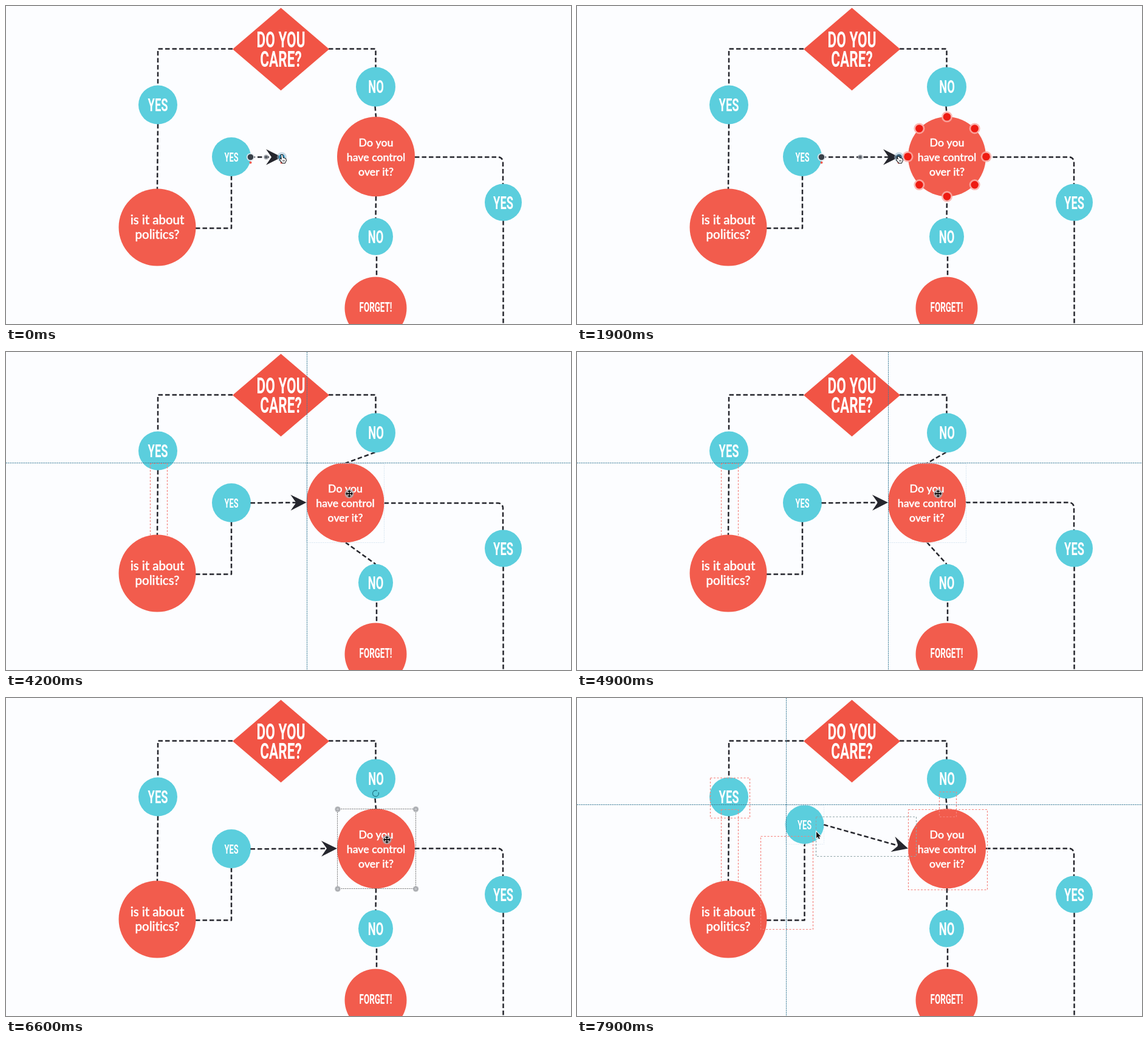
An HTML page with a canvas for the animation above (8 s loop, 930 px wide and 523 px high).

```html
<!DOCTYPE html>
<html lang="en">
<head>
<meta charset="utf-8">
<title>Flowchart editing</title>
<style>
  html, body { margin: 0; width: 100%; height: 100%; overflow: hidden; background: #fcfdff; }
  canvas { display: block; width: 930px; height: 523px; }
</style>
</head>
<body>
<canvas id="stage" width="930" height="523"></canvas>
<script>
const ctx = document.getElementById('stage').getContext('2d');
const LOOP = 8000, STEP = 100, TAU = Math.PI * 2;
const PAPER = '#fcfdff', RED = '#f25c4d', TEAL = '#5bcedd', INK = '#25262d';
const PINK = '#f5827c', GUIDE = '#3c7d98';
const CONDENSED = 0.61;

// Key lists: [time, ...values], linear in between.
const lineEndKeys = [[1300, 454], [1900, 530], [2200, 545]];
const circleKeys = [[3900, 609], [4200, 558.5], [4400, 537], [4800, 560],
  [5100, 608], [5400, 623.5], [5700, 617], [6000, 609]];
const yesKeys = [[7100, 371, 248], [7500, 373, 226], [7900, 374.5, 208]];
const cursorKeys = [[1300, 456, 251], [1900, 531, 251], [2200, 546, 251], [3000, 546, 251],
  [3400, 613, 239], [3900, 627, 233], [4200, 565, 233], [4400, 549, 233], [4800, 578, 233],
  [5100, 627, 233], [5400, 642, 233], [5700, 635, 233], [6000, 627, 233],
  [6600, 627, 233], [7000, 390, 260], [7100, 390, 260], [7900, 394, 220]];

function track(keys, t) {
  if (t <= keys[0][0]) return keys[0].slice(1);
  for (let i = 1; i < keys.length; i++) {
    const a = keys[i - 1], b = keys[i];
    if (t <= b[0]) {
      const k = (t - a[0]) / (b[0] - a[0]);
      return a.slice(1).map((v, j) => v + (b[j + 1] - v) * k);
    }
  }
  return keys[keys.length - 1].slice(1);
}

// Centres a hairline on a pixel.
const crisp = v => Math.floor(v) + 0.5;

function oval(x, y, rx, ry, fill) {
  ctx.beginPath();
  ctx.ellipse(x, y, rx, ry, 0, 0, TAU);
  ctx.fillStyle = fill;
  ctx.fill();
}

function ring(x, y, r, color, width) {
  ctx.beginPath();
  ctx.arc(x, y, r, 0, TAU);
  ctx.strokeStyle = color;
  ctx.lineWidth = width;
  ctx.stroke();
}

function polygon(points, fill, outline) {
  ctx.beginPath();
  points.forEach(([x, y]) => ctx.lineTo(x, y));
  ctx.closePath();
  if (outline) {
    ctx.strokeStyle = outline;
    ctx.lineWidth = 2;
    ctx.stroke();
  }
  ctx.fillStyle = fill;
  ctx.fill();
}

function dashed(points, color = INK, width = 2.5, dash = [7.5, 4], corner = 0) {
  ctx.save();
  ctx.setLineDash(dash);
  ctx.strokeStyle = color;
  ctx.lineWidth = width;
  ctx.lineJoin = 'round';
  ctx.beginPath();
  ctx.moveTo(...points[0]);
  points.slice(1).forEach((p, i) => {
    const next = points[i + 2];
    if (corner && next) ctx.arcTo(...p, ...next, corner);
    else ctx.lineTo(...p);
  });
  ctx.stroke();
  ctx.restore();
}

function box(x0, y0, x1, y1, color = PINK, dash = [3, 2.5], width = 1.2) {
  const [l, t, r, b] = [x0, y0, x1, y1].map(crisp);
  dashed([[l, t], [r, t], [r, b], [l, b], [l, t]], color, width, dash);
}

// Frame around a connector, padded on all sides.
function linkBox(x0, y0, x1, y1, color) {
  const pad = 13;
  box(Math.min(x0, x1) - pad, Math.min(y0, y1) - pad,
    Math.max(x0, x1) + pad, Math.max(y0, y1) + pad, color);
}

function caps(text, x, y, size) {
  ctx.save();
  ctx.translate(x, y + size * 0.355);
  ctx.scale(CONDENSED, 1);
  ctx.font = `700 ${size}px Roboto, "Liberation Sans", sans-serif`;
  ctx.textAlign = 'center';
  ctx.fillStyle = '#fff';
  ctx.fillText(text, 0, 0);
  ctx.restore();
}

function label(lines, x, y, size, leading) {
  ctx.save();
  ctx.font = `500 ${size}px Lato, sans-serif`;
  ctx.letterSpacing = '0.01px'; // turns ligatures off
  ctx.textAlign = 'center';
  ctx.fillStyle = ctx.strokeStyle = '#fff';
  ctx.lineWidth = 0.45;
  lines.forEach((line, i) => {
    ctx.fillText(line, x, y + i * leading);
    ctx.strokeText(line, x, y + i * leading);
  });
  ctx.restore();
}

function arrow(x0, y0, x1, y1) {
  const angle = Math.atan2(y1 - y0, x1 - x0);
  dashed([[x0, y0], [x1 - 14 * Math.cos(angle), y1 - 14 * Math.sin(angle)]]);
  ctx.save();
  ctx.translate(x1, y1);
  ctx.rotate(angle);
  polygon([[0, 0], [-26, -13], [-17, 0], [-26, 13]], INK);
  ctx.restore();
}

function knob(x, y, r, fill) {
  oval(x, y, r + 1.8, r + 1.8, 'rgba(225,232,238,0.9)');
  oval(x, y, r, r, fill);
}

function guides(x, y) {
  dashed([[crisp(x), 0], [crisp(x), 523]], GUIDE, 1, [2, 1]);
  dashed([[0, crisp(y)], [930, crisp(y)]], GUIDE, 1, [2, 1]);
}

function lineHandles(x1, t) {
  const x0 = 402.5, y = 248.5;
  knob(x0, y, 4.8, '#3a4149');
  oval((x0 + x1) / 2, y, 4, 4, 'rgba(150,155,162,0.8)');
  oval((x0 + x1) / 2, y, 2.3, 2.3, '#555b63');
  oval(x0, 257.5, 2, 2, '#ee5a50');
  oval(x1 - 0.5, 257.5, 2, 2, '#ee5a50');
  if (t >= 2300 && t < 3600) ring(x1, y, 14, 'rgba(160,155,160,0.35)', 3);
  if (t < 2700) {
    oval(x1, y, 8, 8, 'rgba(160,190,210,0.55)');
    oval(x1, y, 4.8, 4.8, t < 800 ? '#2c9ac8' : '#3a6079');
  } else knob(x1, y, 4.8, '#3a4149');
}

function anchors(cx, cy) {
  for (let i = 0; i < 8; i++) {
    const a = i * TAU / 8;
    const x = cx + 64.5 * Math.cos(a), y = cy + 65.5 * Math.sin(a);
    oval(x, y, 9, 9, 'rgba(250,170,165,0.85)');
    oval(x, y, 6.3, 6.3, '#ee1b12');
  }
}

function selection(cx) {
  const x0 = cx - 63.5, x1 = cx + 65;
  box(x0, 182, x1, 313, '#555', [1.5, 1.5], 1);
  for (const x of [x0 + 0.5, x1 + 0.5]) for (const y of [183, 314]) {
    oval(x, y, 4.8, 4.8, '#c0c2c6');
    ring(x, y, 3, '#96999d', 1);
  }
  ctx.beginPath();
  ctx.arc(608.5, 157, 5, -0.4, 5.2);
  ctx.strokeStyle = '#247d8c';
  ctx.lineWidth = 1.3;
  ctx.stroke();
}

function moveCursor(x, y, pressed) {
  ctx.save();
  ctx.translate(x, y);
  if (pressed) oval(0, 0, 7.5, 7.5, 'rgba(170,170,175,0.85)');
  for (const [color, width] of [['#fff', 3.2], ['#111', 1.8]]) {
    ctx.strokeStyle = color;
    ctx.lineWidth = width;
    ctx.beginPath();
    ctx.moveTo(-4, 0); ctx.lineTo(4, 0);
    ctx.moveTo(0, -4); ctx.lineTo(0, 4);
    ctx.stroke();
  }
  for (let i = 0; i < 4; i++) {
    polygon([[6, 0], [3, -2.8], [3, 2.8]], '#111');
    ctx.rotate(TAU / 4);
  }
  ctx.restore();
}

function handCursor(x, y, pressed) {
  ctx.save();
  ctx.translate(x, y);
  const top = pressed ? -3 : -6;
  polygon([[-3, top], [-1, top], [0, -1], [4, 0], [5, 3], [3, 7], [-1, 7], [-5, 2], [-4, 0], [-2, 2]],
    '#fff', '#15181c');
  ctx.strokeStyle = '#15181c';
  ctx.lineWidth = 0.8;
  ctx.beginPath();
  for (const dx of [0, 2]) { ctx.moveTo(dx, 2); ctx.lineTo(dx, 5); }
  ctx.stroke();
  ctx.restore();
}

function arrowCursor(x, y) {
  ctx.save();
  ctx.translate(x, y);
  polygon([[0, 0], [0, 10.5], [2.4, 8.3], [4, 12], [5.7, 11.2], [4.2, 7.6], [7.3, 7.4]], '#111', '#fff');
  ctx.restore();
}

function draw(t) {
  const [cx] = track(circleKeys, t);
  const [yx, yy] = track(yesKeys, t);
  const [mx, my] = track(cursorKeys, t);
  const cy = 247.8;
  const draggingCircle = t >= 4000 && t < 6000;
  const draggingYes = t > 7100;
  const editingLine = t < 4000;
  const linkY = t < 4900 ? 248.5 : 247.5;
  const start = [yx + 31.5, editingLine ? 248.5 : yy + 0.3];
  const end = editingLine ? [track(lineEndKeys, t)[0], 248.5] : [cx - 64, 247.5];

  ctx.fillStyle = PAPER;
  ctx.fillRect(0, 0, 930, 523);

  dashed([[373, 70.5], [250, 70.5], [250, 131]]);
  dashed([[250, 194], [249, 301]]);
  dashed([[312, 365.5], [yx, 365.5], [yx, yy + 31]]);
  dashed([[531, 70.5], [608.5, 70.5], [608.5, 102]]);
  dashed([[607.5, 165], [cx, 183]]);
  dashed([[cx, 313], [608.5, 349]]);
  dashed([[610, 412], [610, 446]]);
  dashed([[cx + 64, linkY], [818, linkY], [818, 293]], INK, 2.5, [7.5, 4], 8);
  dashed([[818.5, 353], [818.5, 523]]);

  polygon([[452.5, 3], [532, 71], [452.5, 139], [373, 71]], '#f15445');
  caps('DO YOU', 452.5, 55, 37);
  caps('CARE?', 452.5, 87, 37);

  oval(250, 162.5, 32, 32, TEAL);
  caps('YES', 250, 162, 30);
  oval(608.5, 133, 32.5, 32.5, TEAL);
  caps('NO', 609, 132.5, 30);
  oval(608.5, 379.3, 28.5, 30.5, TEAL);
  caps('NO', 608.5, 379.5, 30);
  oval(818.5, 323, 30.5, 30.5, TEAL);
  caps('YES', 818.5, 323.5, 30);
  oval(yx, yy, 32, 32, TEAL);
  caps('YES', yx, yy + 0.5, 21);

  // This frame passes behind the circle below it.
  if (draggingCircle || draggingYes) linkBox(250, 196, 252, 300);

  oval(249, 364, 63.5, 63.5, RED);
  label(['is it about', 'politics?'], 249, 358.5, 20.4, 24.5);
  oval(608.5, 497, 51, 51.5, RED);
  caps('FORGET!', 608.5, 495.5, 22);
  oval(cx, cy, 64, 65.5, RED);
  label(['Do you', 'have control', 'over it?'], cx, 231, 17.7, 24.2);

  if (t >= 1600 && t < 2700) anchors(cx, cy);
  arrow(...start, ...end);
  if (editingLine) lineHandles(end[0], t);

  if (t >= 3300 && t < 4000) box(545, 182, 673, 313, '#60646a', [3.5, 2], 1);

  if (draggingCircle) {
    box(cx - 64, 183, cx + 64, 313, '#cfe0ee', [1.5, 1.5], 1);
    if (Math.abs(cx - 623) < 7) {
      box(373, 4, 534, 141);
      linkBox(...start, ...end);
      linkBox(cx, 314, 610, 350);
      box(558, 446, 661, 548);
    }
    guides(cx - 63.5, 182);
  }

  if (t >= 6000 && t <= 7000) selection(cx);

  if (draggingYes) {
    box(yx - 31, yy - 32, yx + 32, yy + 32, '#dfe9f2', [1.5, 1.5], 1);
    box(219, 131, 284, 197);
    linkBox(315, 367, yx + 1, yy + 32);
    linkBox(609, 167, 611, 182);
    box(545, 183, 675, 315);
    linkBox(...start, ...end, '#91a5a9');
    guides(yx - 30, yy - 32.5);
  }

  if (t < 3200) handCursor(mx, my, t >= 800 && t < 2700);
  else if (t < 6700) moveCursor(mx, my, t >= 4000);
  else arrowCursor(mx, my);
}

const began = performance.now();
function tick() {
  const t = (performance.now() - began) % LOOP;
  draw(Math.floor(t / STEP) * STEP);
  requestAnimationFrame(tick);
}
tick();
</script>
</body>
</html>
```
